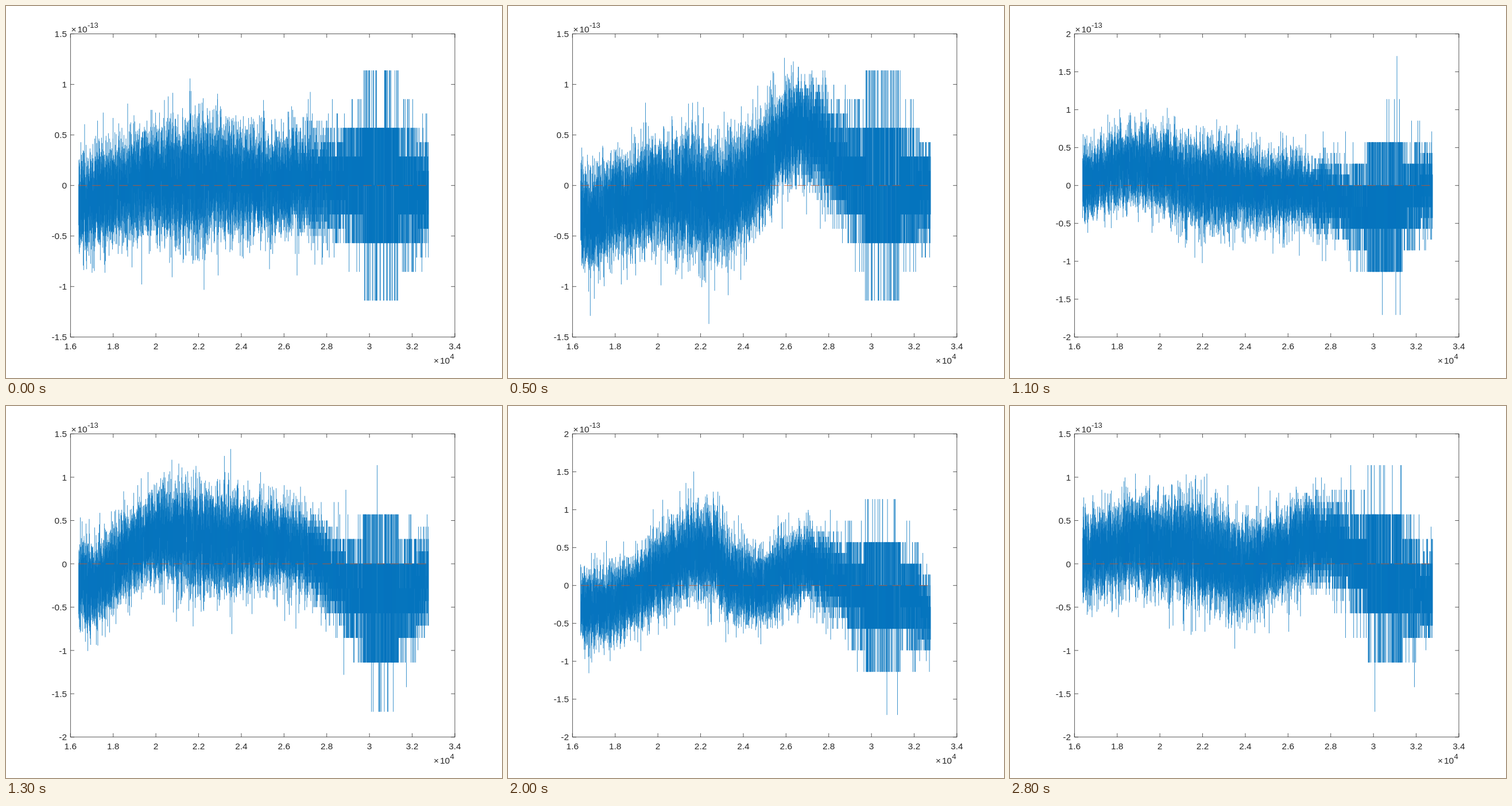
Animation of 864x648 px, one loop 2900 ms. Source, as an HTML page with a canvas:

```html
<!DOCTYPE html>
<html lang="en">
<head>
<meta charset="utf-8">
<title>Rounding error</title>
<style>
  html, body { margin: 0; width: 100%; height: 100%; overflow: hidden; background: #fff; }
  canvas { display: block; width: 864px; height: 648px; }
</style>
</head>
<body>
<canvas id="plot" width="864" height="648"></canvas>
<script>
const W = 864, H = 648;
const ctx = document.getElementById('plot').getContext('2d');
const BOX = { l: W * .13, r: W * .905, t: H * .075, b: H * .89 };
const STEP = 100, COUNT = 29;
const FIRST = 1.6384, LAST = 3.2767; // x in units of 1e4
const ULP = .1421;                   // rounding unit, y in units of 1e-13
const THIN = .77;
const BLUE = '#0072bd', RED = '#d95319', INK = '#262626';
const FONT = '"Liberation Sans", Helvetica, Arial, sans-serif';

// Drift of the error: y limits, base level and bumps [x, height]
const poses = [
  { at: 0, lim: [-1.5, 1.5], base: .04, bumps: [[1.64, -.22], [3.3, -.12]] },
  { at: 5, lim: [-1.5, 1.5], base: -.05, bumps: [[1.66, -.28], [2.32, -.12], [2.66, .62]] },
  { at: 9, lim: [-2.5, 1.5], base: -.25, bumps: [[1.64, .33], [1.84, .58], [2.6, -.1], [3.3, .42]] },
  { at: 13, lim: [-2, 1.5], base: .24, bumps: [[1.68, -.5], [2, .1], [2.95, -.5], [3.2, -.45]] },
  { at: 20, lim: [-2, 2], base: 0, bumps: [[1.7, -.3], [2.2, .47], [2.47, -.25], [2.67, .4], [2.92, -.13], [3.38, -.5]] },
  { at: 24, lim: [-1.5, 2], base: .08, bumps: [[2.13, .28], [2.6, -.45], [2.82, -.28]] },
  { at: 28, lim: [-2, 1.5], base: .15, bumps: [[1.64, -.1], [1.88, .1], [2.43, -.2], [2.72, .15], [3.05, -.2], [3.3, -.45]] }
];

const bell = (x, mid) => Math.exp(-(((x - mid) / .2) ** 2));
const drift = (pose, x) => pose.bumps.reduce((sum, [mid, h]) => sum + h * bell(x, mid), pose.base);

// Rounding halves with each stretch away from its coarsest place
const grainAt = x => 4 * ULP / 2 ** Math.min(6, Math.floor(Math.abs(x - 3.053) / .083));
const spreadAt = (x, grain) => Math.hypot(.235 + .055 * bell(x, 2.2), .62 * grain);

function rng(seed) {
  return () => {
    seed = seed + 0x6d2b79f5 | 0;
    let t = Math.imul(seed ^ seed >>> 15, 1 | seed);
    t = t + Math.imul(t ^ t >>> 7, 61 | t) ^ t;
    return ((t ^ t >>> 14) >>> 0) / 4294967296;
  };
}

const xPix = x => BOX.l + (x - 1.6) / 1.8 * (BOX.r - BOX.l);

// Three columns per pixel, each with the extremes of nine samples
function makeTrace(step) {
  const rand = rng(7919 * (step + 1));
  const gauss = () => Math.sqrt(-2 * Math.log(1 - rand())) * Math.cos(2 * Math.PI * rand());
  const next = poses.findIndex(p => p.at >= step);
  const b = poses[next], a = b.at === step ? b : poses[next - 1];
  const mix = a === b ? 0 : (step - a.at) / (b.at - a.at);
  const [floor, ceil] = a === b ? a.lim : [-2, 2];
  const size = Math.round((xPix(LAST) - xPix(FIRST)) * 3);
  const cols = [];
  let min = -1.5, max = 1.5;
  for (let c = 0; c <= size; c++) {
    const x = FIRST + (LAST - FIRST) * c / size;
    const mean = drift(a, x) * (1 - mix) + drift(b, x) * mix;
    const grain = grainAt(x), spread = spreadAt(x, grain);
    let lo = Infinity, hi = -Infinity;
    for (let n = 0; n < 9; n++) {
      let v;
      do v = Math.round((mean + spread * gauss()) / grain) * grain;
      while (v < floor || v > ceil);
      lo = Math.min(lo, v);
      hi = Math.max(hi, v);
    }
    cols.push({ x: xPix(x), lo, hi });
    min = Math.min(min, lo);
    max = Math.max(max, hi);
  }
  const lim = a === b ? a.lim : [Math.floor(min * 2) / 2, Math.ceil(max * 2) / 2];
  return { cols, lim };
}

function text(str, x, y, size = 15.4, align = 'left') {
  ctx.font = size + 'px ' + FONT;
  ctx.textAlign = align;
  ctx.fillText(str, x, y);
}

function line(x1, y1, x2, y2) {
  ctx.beginPath();
  ctx.moveTo(x1, y1);
  ctx.lineTo(x2, y2);
  ctx.stroke();
}

function powerLabel(x, y, exponent) {
  text('×', x, y);
  text('10', x + 11, y);
  text(exponent, x + 28.5, y - 8, 13);
}

function drawAxes(lim, yPix) {
  const { l, r, t, b } = BOX, tick = 6.7;
  ctx.strokeStyle = ctx.fillStyle = INK;
  ctx.strokeRect(l, t, r - l, b - t);
  for (let i = 0; i <= 9; i++) {
    const v = 1.6 + i * .2, x = xPix(v);
    line(x, b, x, b - tick);
    line(x, t, x, t + tick);
    text(String(+v.toFixed(1)), x, 597.5, 15.4, 'center');
  }
  for (let v = lim[0]; v <= lim[1]; v += .5) {
    const y = yPix(v);
    line(l, y, l + tick, y);
    line(r, y, r - tick, y);
    text(String(v), 106, y + 5.7, 15.4, 'right');
  }
  powerLabel(113.5, 46, '-13');
  powerLabel(745, 623, '4');
}

function draw({ cols, lim }) {
  const yPix = v => BOX.b - (v - lim[0]) / (lim[1] - lim[0]) * (BOX.b - BOX.t);
  ctx.fillStyle = '#fff';
  ctx.fillRect(0, 0, W, H);

  ctx.fillStyle = BLUE;
  for (const { x, lo, hi } of cols) {
    ctx.fillRect(x - THIN / 2, yPix(hi) - THIN / 2, THIN, yPix(lo) - yPix(hi) + THIN);
  }

  ctx.lineWidth = THIN;
  ctx.strokeStyle = RED;
  ctx.setLineDash([14.75, 8.85]);
  line(xPix(FIRST), yPix(0), xPix(LAST), yPix(0));
  ctx.setLineDash([]);

  drawAxes(lim, yPix);
}

const traces = Array.from({ length: COUNT }, (_, i) => makeTrace(i));
const start = performance.now();
let shown = -1;

function tick() {
  const step = Math.floor((performance.now() - start) / STEP) % COUNT;
  if (step !== shown) draw(traces[shown = step]);
  requestAnimationFrame(tick);
}
tick();
</script>
</body>
</html>
```
